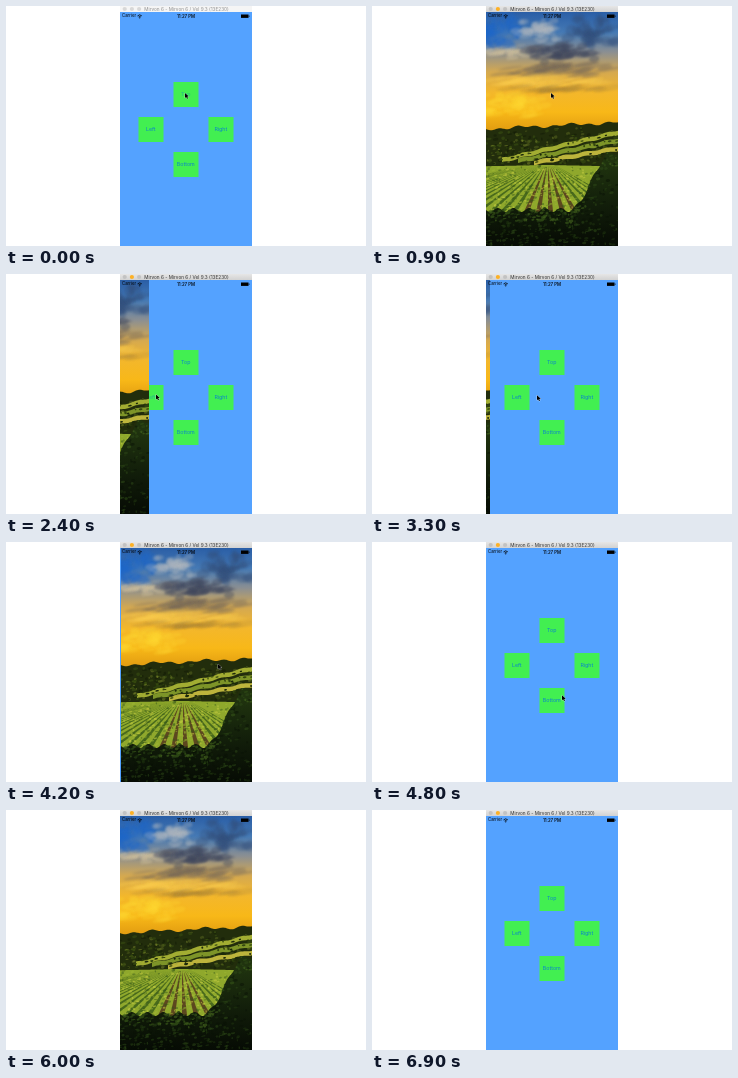
These frames come from a looping animation (360x240 px, 7200 ms). An HTML page with a canvas:

```html
<!DOCTYPE html>
<html lang="en">
<head>
<meta charset="utf-8">
<title>Slide-in transitions</title>
<style>
  html, body { margin: 0; width: 100%; height: 100%; overflow: hidden; background: #fff; }
  canvas { display: block; }
</style>
</head>
<body>
<canvas id="stage" width="360" height="240"></canvas>
<script>
const ctx = document.getElementById("stage").getContext("2d");
const LOOP = 7200, STEP = 300, SLIDE_TIME = 350;
const LEFT = 114, TOP = 6, WIDTH = 132, HEIGHT = 234;
const CENTER = { x: 180, y: 123.5 }, SPREAD = 35, BUTTON = 25;
const FONT = "Inter, 'Liberation Sans', sans-serif";

// Each button lies on the side its picture slides in from; times in ms.
const sides = [
  { label: "Top", dx: 0, dy: -1, open: 495, close: 1150 },
  { label: "Left", dx: -1, dy: 0, open: 2295, close: 2985 },
  { label: "Right", dx: 1, dy: 0, open: 3795, close: 4185 },
  { label: "Bottom", dx: 0, dy: 1, open: 5295, close: 5995 }
];

const pointerStops = [
  { at: 0, x: 179, y: 87 },
  { at: 2100, x: 150, y: 120.5 },
  { at: 3300, x: 165, y: 121.3 },
  { at: 3600, x: 212, y: 122 },
  { at: 4800, x: 190, y: 153.3 }
];
const POINTER_GONE = 6000;

const ease = p => {
  p = Math.min(1, Math.max(0, p));
  return p * p * (3 - 2 * p);
};

function seededRandom(seed) {
  return () => (seed = (seed * 16807) % 2147483647) / 2147483647;
}

function gradient(c, y0, y1, ...colors) {
  const g = c.createLinearGradient(0, y0, 0, y1);
  colors.forEach((color, i) => g.addColorStop(i / (colors.length - 1), color));
  return g;
}

function paintLandscape() {
  const canvas = document.createElement("canvas");
  canvas.width = WIDTH;
  canvas.height = HEIGHT;
  const c = canvas.getContext("2d");
  const random = seededRandom(77);
  const spread = () => random() + random() - 1;

  const puff = (color, x, y, rx, ry) => {
    c.fillStyle = color;
    c.beginPath();
    c.ellipse(x, y, rx, ry, -.15, 0, 7);
    c.fill();
  };
  const cloud = (color, x, y, w, h) => {
    for (let i = 0; i < 45; i++) {
      puff(color, x + spread() * w, y + spread() * h, w * (.1 + random() * .2), h * (.1 + random() * .25));
    }
  };
  // Fills between two curves y = f(x).
  const band = (color, top, bottom, from = 0) => {
    c.fillStyle = color;
    c.beginPath();
    for (let x = from; x <= WIDTH; x++) c.lineTo(x, top(x));
    for (let x = WIDTH; x >= from; x--) c.lineTo(x, bottom(x));
    c.fill();
  };
  const foliage = (count, top, bottom, size, colors) => {
    for (let i = 0; i < count; i++) {
      const x = random() * WIDTH;
      const y = top(x) + random() * (bottom(x) - top(x));
      puff(colors[i % colors.length], x, y, size * (.4 + random()), size * (.3 + random() * .6));
    }
  };
  const floor = () => HEIGHT;

  // Sky
  c.fillStyle = gradient(c, 0, 120, "#2a5ea6", "#4579b4", "#8b8f92", "#d5a950", "#f3b72c", "#f8b818", "#e09a10");
  c.fillRect(0, 0, WIDTH, 120);
  c.filter = "blur(1.2px)";
  cloud("#1c66c850", 8, 20, 32, 22);
  cloud("#b4bac050", 50, 18, 26, 12);
  cloud("#34507c50", 108, 20, 30, 18);
  cloud("#d8c8a048", 24, 40, 34, 7);
  cloud("#3b435a60", 75, 40, 40, 11);
  cloud("#73665a50", 66, 57, 62, 7);
  cloud("#ffd25048", 60, 69, 70, 6);
  cloud("#a8823a40", 72, 77, 62, 4);
  cloud("#ffd83048", 28, 93, 40, 12);

  // Hills, with fields rising to the right
  const ridge = x => 117 - x * .05 + Math.sin(x * .35) + Math.sin(x * .13);
  const meadow = x => 152 + Math.sin(x * .2);
  c.filter = "blur(.4px)";
  band("#222d0c", ridge, floor);
  foliage(160, x => ridge(x) + 3, meadow, 2, ["#11190680", "#59671f80", "#2f400f"]);
  ["#a2ad32", "#7d9428", "#bdb43c"].forEach((color, i) => {
    const slope = .24 - i * .035;
    const top = x => 146 + i * 4 - (x - 16) * slope + Math.sin(x * .3) * .6;
    band(color, top, x => top(x) + 4.5, 16 + i * 16);
  });
  foliage(140, x => ridge(x) + 12, meadow, 1.5, ["#1c290a", "#98a53560", "#34470f"]);

  // Vineyard rows fanning out from a vanishing point
  const brow = x => 153 + Math.abs(x - 62) * .02;
  band("#8fa82c", brow, floor);
  for (let i = -20; i <= 7; i++) {
    const near = 62 + i * 14;
    c.fillStyle = Math.abs(i) < 3 ? "#5c471f" : "#496a1c";
    c.beginPath();
    c.moveTo(62 + i * 1.2, 154);
    c.lineTo(near + 6, 208);
    c.lineTo(near, 208);
    c.fill();
  }
  foliage(650, brow, () => 206, 1.3, ["#c4cc4290", "#35581a80", "#9bb53490"]);

  // Bushes climbing on the right
  const bush = x => 198 - 57 * ease((x - 84) / 42) + Math.sin(x * .4) * 2;
  band(gradient(c, 150, HEIGHT, "#20330f", "#121e0a", "#060b04"), bush, floor);
  foliage(420, bush, floor, 1.7, ["#2e4a1780", "#0a120580", "#1f361080"]);
  foliage(90, bush, x => bush(x) + 12, 1.7, ["#496b2090", "#2a4313"]);
  return canvas;
}

const landscape = paintLandscape();

function text(string, x, y, size, color, align = "center", weight = 400) {
  ctx.font = `${weight} ${size}px ${FONT}`;
  ctx.textAlign = align;
  ctx.textBaseline = "middle";
  ctx.fillStyle = color;
  ctx.fillText(string, x, y);
}

function dot(x, y, r, color) {
  ctx.fillStyle = color;
  ctx.beginPath();
  ctx.arc(x, y, r, 0, 7);
  ctx.fill();
}

function drawTitleBar(active) {
  ctx.fillStyle = active ? gradient(ctx, 0, TOP, "#e6e6e6", "#d2d2d2") : "#f5f5f5";
  ctx.fillRect(LEFT, 0, WIDTH, TOP);
  for (let i = 0; i < 3; i++) {
    dot(118.7 + i * 7.2, 3, 2.1, !active ? "#d8d8d8" : i === 1 ? "#fdb125" : "#c2c2c2");
  }
  text("Mirvon 6 - Mirvon 6 / Vel 9.3 (13E230)", 180.5, 3.2, 4.7, active ? "#303030" : "#909090");
}

function drawStatusBar() {
  text("Carrier", 116, 10.2, 4.3, "#000", "left");
  text("11:27 PM", 180, 10.2, 4.4, "#000", "center", 500);
  ctx.strokeStyle = "#000";
  ctx.lineWidth = .8;
  for (const r of [1.5, 3]) {
    ctx.beginPath();
    ctx.arc(133.7, 12, r, -Math.PI * .76, -Math.PI * .24);
    ctx.stroke();
  }
  dot(133.7, 11.8, .6, "#000");
  ctx.fillStyle = "#000";
  ctx.fillRect(235, 8.5, 7.5, 3.4);
  ctx.fillRect(242.8, 9.5, .6, 1.4);
}

function drawButton({ label, dx, dy }, pointer) {
  const x = CENTER.x + dx * SPREAD, y = CENTER.y + dy * SPREAD;
  ctx.fillStyle = "#42ef51";
  ctx.fillRect(x - BUTTON / 2, y - BUTTON / 2, BUTTON, BUTTON);
  const hovered = pointer && Math.hypot(pointer.x - x, pointer.y - y) < 9;
  text(label, x - .2, y + .2, 5.3, hovered ? "#0b83cc80" : "#0b83cc");
}

function drawSlide({ dx, dy, open, close }, time) {
  const shown = ease((time - open) / SLIDE_TIME) - ease((time - close) / SLIDE_TIME);
  if (shown <= 0) return;
  const hidden = 1 - shown;
  ctx.drawImage(landscape, LEFT + Math.round(dx * hidden * WIDTH), TOP + Math.round(dy * hidden * HEIGHT));
}

function drawPointer({ x, y }) {
  ctx.save();
  ctx.translate(x, y);
  const arrow = new Path2D("M0 0V5L1.2 4 2 5.8 3 5.4 2.2 3.6 3.8 3.5Z");
  ctx.strokeStyle = "#ffffffa0";
  ctx.lineWidth = .8;
  ctx.stroke(arrow);
  ctx.fillStyle = "#000";
  ctx.fill(arrow);
  ctx.restore();
}

function draw(time) {
  const pointer = time < POINTER_GONE && pointerStops.filter(stop => stop.at <= time).pop();
  ctx.fillStyle = "#fff";
  ctx.fillRect(0, 0, 360, 240);

  ctx.save();
  ctx.beginPath();
  ctx.rect(LEFT, TOP, WIDTH, HEIGHT);
  ctx.clip();
  ctx.fillStyle = "#54a2ff";
  ctx.fillRect(LEFT, TOP, WIDTH, HEIGHT);
  sides.forEach(side => drawButton(side, pointer));
  sides.forEach(side => drawSlide(side, time));
  drawStatusBar();
  ctx.restore();

  drawTitleBar(time >= 600);
  if (pointer) drawPointer(pointer);
}

function tick() {
  const time = performance.now() % LOOP;
  draw(time - time % STEP);
  requestAnimationFrame(tick);
}
tick();
</script>
</body>
</html>
```
